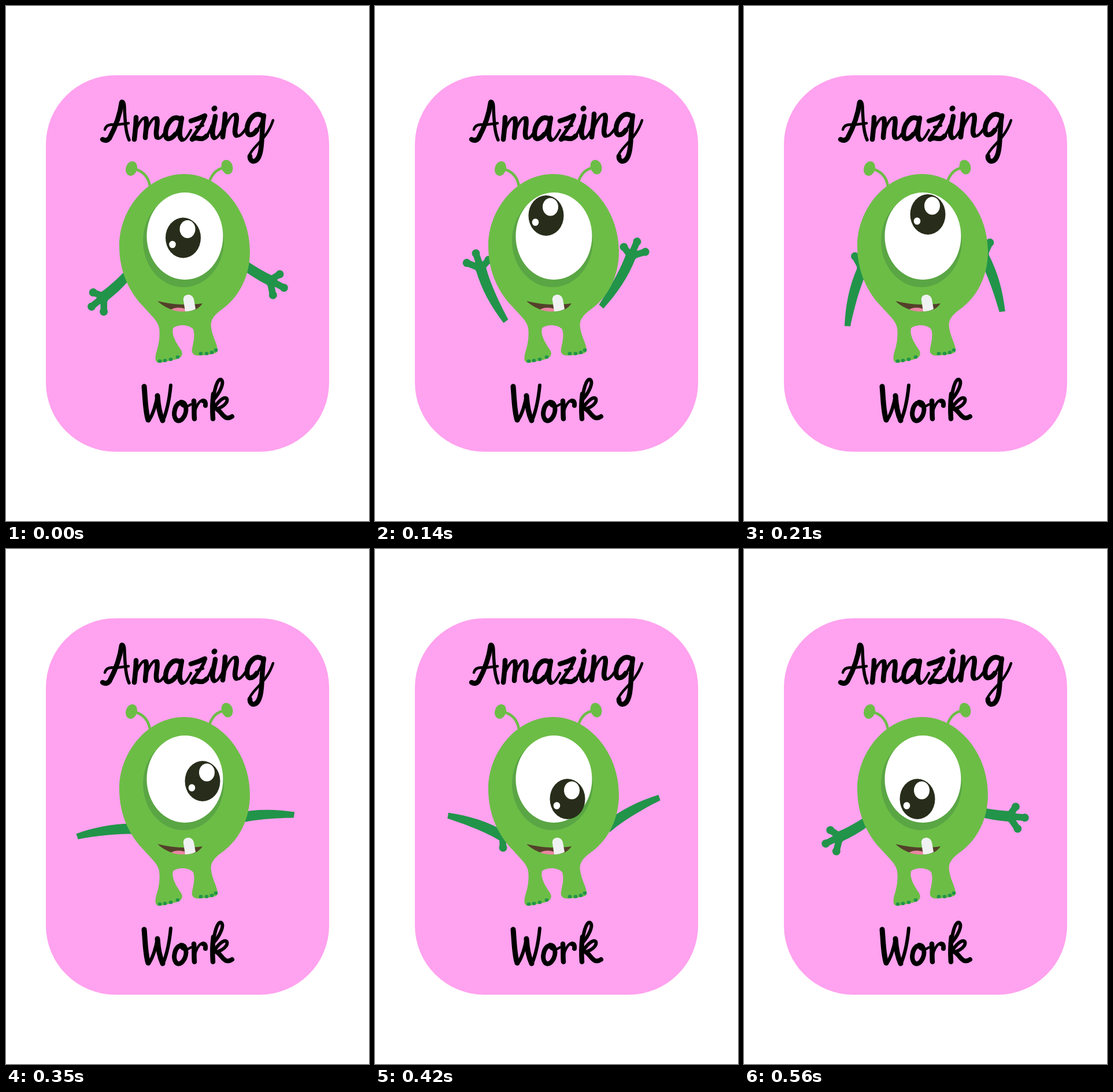
These frames come from a looping animation (628 px wide and 892 px high, 630 ms). An HTML page with a canvas:

```html
<!DOCTYPE html>
<html lang="en">
<head>
<meta charset="utf-8">
<title>Amazing Work</title>
<style>
html, body { margin: 0; width: 100%; height: 100%; overflow: hidden; background: #fff; }
canvas { display: block; width: 628px; height: 892px; }
</style>
</head>
<body>
<canvas id="stage" width="628" height="892" role="img" aria-label="Amazing Work"></canvas>
<script>
const ctx = document.getElementById('stage').getContext('2d');
const GREEN = '#6cbd46', SHADE = '#5aa644', LIMB = '#21944a', INK = '#000', PUPIL = '#272d1a';
const STEP = 70;

// One pose per step. Eye: x, y. Arms: degrees, x, y, hand hidden.
const poses = [
  { eye: [306.5, 401.5], left: [-52, 195, 485], right: [41, 428, 462] },
  { eye: [283.5, 383],   left: [0, 191, 485],   right: [7, 428, 462] },
  { eye: [296, 363],     left: [59, 191, 485],  right: [-54, 432, 463] },
  { eye: [318, 361],     left: [99, 191, 485],  right: [-103, 430, 461] },
  { eye: [337.5, 371],   left: [139, 191, 484], right: [-152, 428, 458] },
  { eye: [340, 402],     left: [167, 192, 483], right: [-178, 428, 459, true] },
  { eye: [333, 433],     left: [195, 194, 481], right: [-204, 428, 460, true] },
  { eye: [318, 439],     left: [258, 194, 483], right: [-273, 428, 461] },
  { eye: [300, 433],     left: [321, 195, 486], right: [18, 427, 462] }
];

// Brush lettering: width, then the pen's path.
const lettering = [
  // A
  [8.5, 'M200 167 C197 190 187 214 179 229 Q174 235 167 231'],
  [5.5, 'M200 165 Q205 164 205 177 C206 200 207 219 213 232'],
  [4.5, 'M171 214 Q174 203 189 206 L212 203'],
  // m
  [8.5, 'M225 193 C225 207 223 221 222 231'],
  [4.5, 'M223 221 C228 204 237 191 242 194'],
  [8.5, 'M242 195 C245 204 241 217 241 228'],
  [4.5, 'M241 222 C247 203 256 190 261 194'],
  [8.5, 'M261 195 C264 205 257 219 261 227'],
  [4.5, 'M261 229 Q267 232 274 220'],
  // a
  [8.5, 'M300 195 C288 188 276 206 276 222 C276 234 286 231 293 222'],
  [4.5, 'M291 225 Q299 213 303 197'],
  [8.5, 'M304 194 C302 207 297 225 304 231'],
  [4.5, 'M304 233 C309 234 315 225 320 215'],
  // z
  [8.5, 'M320 199 Q332 196 344 190'],
  [6, 'M345 190 C342 203 330 216 321 230'],
  [8.5, 'M322 231 C331 224 337 236 347 225'],
  [4.5, 'M329 210 L341 207 M346 227 Q353 217 356 207'],
  // i
  [8.5, 'M362 191 C361 203 353 222 360 228'],
  [4.5, 'M360 230 Q366 230 375 213'],
  [9, 'M361 177 L360 178'],
  // n
  [8.5, 'M379 187 C379 201 376 215 375 227'],
  [4.5, 'M376 219 C382 200 392 184 398 188'],
  [8.5, 'M398 189 C402 198 392 217 398 224'],
  [4.5, 'M398 226 Q406 227 415 212'],
  // g
  [8.5, 'M443 190 C430 181 417 199 417 214 C417 227 427 225 434 215'],
  [4.5, 'M432 218 Q441 207 445 192'],
  [8.5, 'M446 190 C442 211 444 237 440 253 C435 275 421 271 422 260'],
  [4.5, 'M421 259 C426 243 451 232 462 198'],
  // W
  [9, 'M239 659 C241 680 241 702 246 717'],
  [6, 'M247 718 C254 708 260 689 262 674'],
  [9, 'M262 675 C263 691 266 707 271 718'],
  [6, 'M272 717 C279 700 283 678 285 657'],
  // o
  [8, 'M303 687 C292 688 288 708 294 716 C302 725 314 707 311 694 Q309 686 303 686'],
  [4.5, 'M302 689 Q308 698 320 690'],
  // r
  [8.5, 'M325 684 C326 696 325 706 326 715'],
  [4.5, 'M326 705 C329 693 335 682 341 683'],
  [8, 'M341 684 Q346 684 345 692'],
  // k
  [8.5, 'M359 672 C357 687 357 702 358 715'],
  [6, 'M358 688 C360 666 365 645 372 647 C379 652 369 671 359 682'],
  [6, 'M359 698 C365 687 377 675 382 680 C385 687 374 696 363 698'],
  [8, 'M366 699 C373 703 378 720 391 711']
].map(([width, d]) => [width, new Path2D(d)]);

const body = new Path2D(
  'M308 291 C370 291 422 353 422 425 C422 470 402 503 378 522 C360 535 353 543 355 557' +
  ' C357 572 364 582 366 594 C368 603 356 603 340 605 C326 607 320 603 322 593' +
  ' C325 580 327 570 324 560 C317 551 297 551 289 558 C286 568 293 582 303 596' +
  ' C308 605 302 611 290 613 L267 618 C258 619 257 611 260 600 C264 588 267 573 265 558' +
  ' C263 545 250 535 239 522 C215 498 196 462 196 416 C196 351 246 291 308 291Z');
const stalks = new Path2D('M249 312 Q245 288 222 282 M352 304 Q359 283 378 280');
const mouth = new Path2D('M262 511 C285 517 315 519 340 515 C334 524 325 529 309 529 C289 529 274 522 262 511Z');
const tongue = new Path2D('M286 526 C291 521 306 521 318 528 Q300 531 286 526Z');
const tooth = new Path2D('M307 510 C305 498 322 496 325 508 L328 525 Q320 529 310 529Z');
const sleeve = new Path2D('M-32 -19 C-8 -11 30 -6 70 -4 L71 6 C36 10 2 9 -32 0Z');
const fingers = [[-57, -15], [-36, -28], [-51, 7]];
const toes = [[266, 615], [275, 614], [285, 612], [297, 608], [337, 602], [347, 602], [356, 600], [363, 596]];

function fill(path, color) {
  ctx.fillStyle = color;
  ctx.fill(path);
}

function stroke(path, width, color) {
  ctx.lineWidth = width;
  ctx.strokeStyle = color;
  ctx.stroke(path);
}

function oval(x, y, rx, ry, color, tilt = 0) {
  const path = new Path2D();
  path.ellipse(x, y, rx, ry, tilt, 0, Math.PI * 2);
  fill(path, color);
}

function arm([degrees, x, y, hidden], side) {
  ctx.save();
  ctx.translate(x, y);
  ctx.rotate(degrees * Math.PI / 180);
  ctx.scale(side, 1);
  fill(sleeve, LIMB);
  if (!hidden) {
    oval(-34, -9, 11, 10, LIMB);
    for (const [fx, fy] of fingers) {
      stroke(new Path2D(`M-30 -9 L${fx} ${fy}`), 11.5, LIMB);
      oval(fx, fy, 7, 7, LIMB);
    }
  }
  ctx.restore();
}

function eye([x, y]) {
  oval(307, 407, 70, 80, SHADE);
  oval(309.5, 398.5, 66, 75.5, '#fff');
  oval(x, y, 30.5, 35, PUPIL);
  oval(x + 7.5, y - 15, 13.5, 15.5, '#fff');
  oval(x - 18.5, y + 11.5, 5.8, 6.3, '#fff');
}

function draw({ eye: gaze, left, right }) {
  ctx.fillStyle = '#fff';
  ctx.fillRect(0, 0, 628, 892);
  ctx.lineCap = ctx.lineJoin = 'round';

  const card = new Path2D();
  card.roundRect(69, 120, 490, 652, 120);
  fill(card, '#ffa2ef');
  for (const [width, path] of lettering) stroke(path, width, INK);

  arm(left, 1);
  arm(right, -1);
  stroke(stalks, 4.5, GREEN);
  oval(217, 281.5, 9.7, 12.8, GREEN, 0.3);
  oval(382.5, 279, 9.7, 12.8, GREEN, -0.3);
  fill(body, GREEN);
  for (const [x, y] of toes) oval(x, y, 3.4, 3, LIMB);

  eye(gaze);
  fill(mouth, '#54402a');
  fill(tongue, '#ea86a2');
  fill(tooth, '#f0f1f2');
}

const start = performance.now();
function tick() {
  const step = Math.floor((performance.now() - start) / STEP) % poses.length;
  draw(poses[step]);
  requestAnimationFrame(tick);
}
tick();
</script>
</body>
</html>
```
